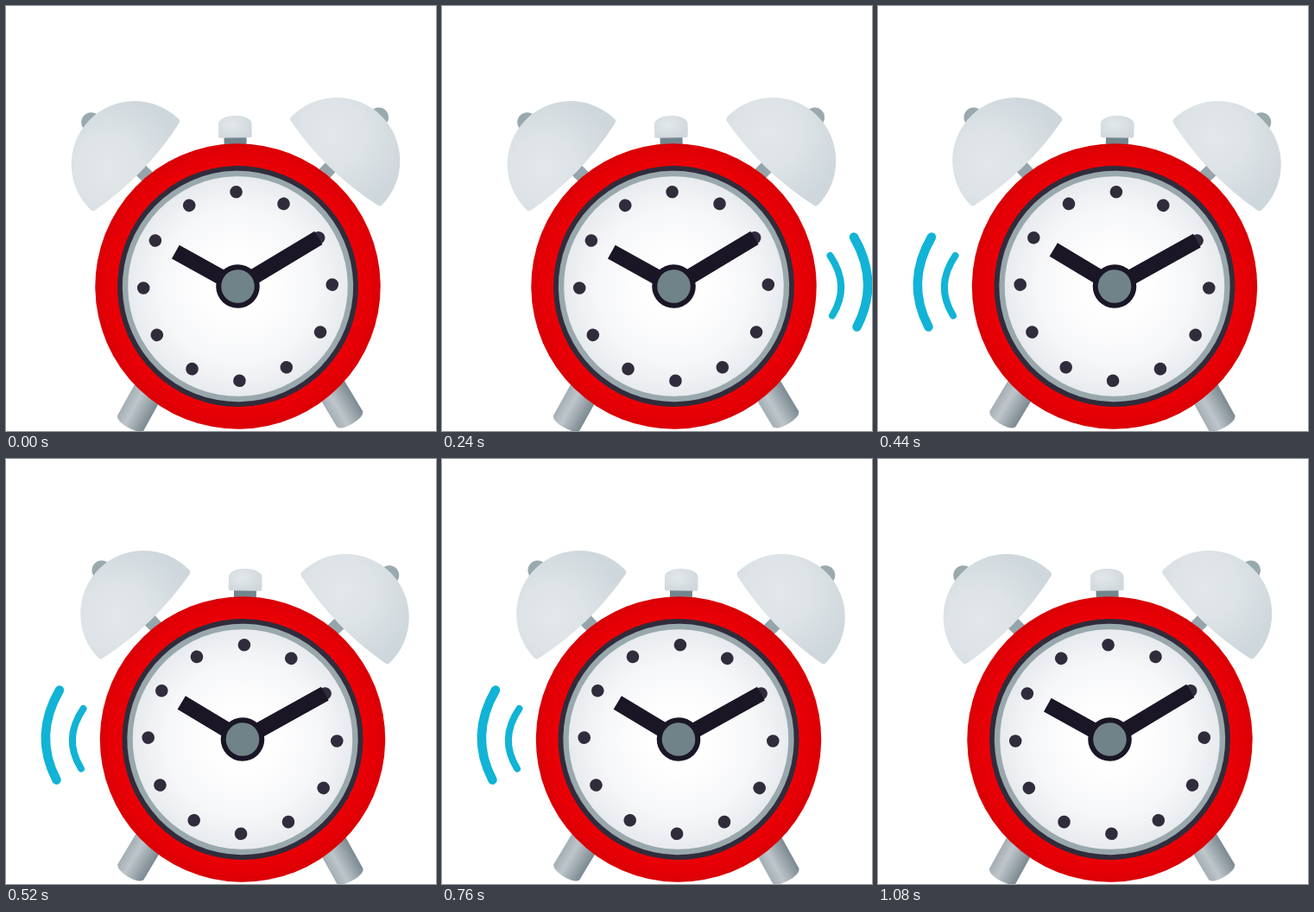
An HTML page for the animation above (1.92 s loop, 498 px wide and 492 px high).

```html
<!DOCTYPE html>
<html lang="en">
<head>
<meta charset="utf-8">
<title>Ringing alarm clock</title>
<style>
  html, body { margin: 0; width: 100%; height: 100%; overflow: hidden; background: #fff; }
  svg { display: block; width: 498px; height: 492px; }
</style>
</head>
<body>
<svg viewBox="0 0 498 492">
  <defs>
    <radialGradient id="red" gradientUnits="userSpaceOnUse" cx="0" cy="0" r="165.2">
      <stop offset=".84" stop-color="#ea0006"/>
      <stop offset=".93" stop-color="#e40006"/>
      <stop offset="1" stop-color="#d90005"/>
    </radialGradient>
    <radialGradient id="dial">
      <stop offset=".25" stop-color="#fff"/>
      <stop offset=".7" stop-color="#f6f7f9"/>
      <stop offset="1" stop-color="#e8ebee"/>
    </radialGradient>
    <radialGradient id="silver" gradientUnits="userSpaceOnUse" cx="-25" cy="-22" r="88">
      <stop offset="0" stop-color="#e3e8ea"/>
      <stop offset=".45" stop-color="#dde3e6"/>
      <stop offset="1" stop-color="#ced7dc"/>
    </radialGradient>
    <radialGradient id="cap" cx=".4" cy=".4" r=".65">
      <stop offset="0" stop-color="#e3e8ea"/>
      <stop offset="1" stop-color="#d0d8dd"/>
    </radialGradient>
    <linearGradient id="steel">
      <stop offset="0" stop-color="#a3aeb4"/>
      <stop offset=".35" stop-color="#bec6cb"/>
      <stop offset="1" stop-color="#7b8990"/>
    </linearGradient>
    <g id="bell">
      <circle cy="-73" r="11.3" fill="#99a9ae"/>
      <path d="M-8 0H8V45H-8Z" fill="#95a5ab"/>
      <path d="M-73.2-3A73.2 73.2 0 0 1 73.2-3Q73.5 0 70 1Q0 15-70 1Q-73.5 0-73.2-3Z" fill="url(#silver)"/>
    </g>
    <path id="leg" d="M-17.5-65H17.5V0Q15 6 0 6T-17.5 0Z" fill="url(#steel)"/>
    <g id="waves" fill="none" stroke="#11b3d6" stroke-linecap="round">
      <path d="M477 267.5Q507.500 320 480.500 371.500" stroke-width="10.500"/>
      <path d="M449.500 289Q473.500 324 452 358.500" stroke-width="8"/>
    </g>
  </defs>

  <g id="clock">
    <use href="#leg" transform="translate(-127 156) rotate(30)"/>
    <use href="#leg" transform="translate(127 156) rotate(-30)"/>
    <use href="#bell" transform="translate(-115 -141.2) rotate(-45)"/>
    <use href="#bell" transform="translate(115 -141.2) rotate(45)"/>
    <path d="M-13-175H13V-160H-13Z" fill="#74868d"/>
    <path d="M-19.300-174V-188C-19.300-194-10-197.500 0-197.500S19.300-194 19.300-188V-174Q19.300-172 17-172H-17Q-19.300-172-19.300-174Z" fill="url(#cap)"/>
    <circle r="165.200" fill="url(#red)"/>
    <circle r="139.500" fill="#302c3b"/>
    <circle r="133.700" fill="#99a8ad"/>
    <circle r="127.300" fill="url(#dial)"/>
    <g id="dots" fill="#302c3b"></g>
    <g fill="#1a1626">
      <path d="M-9 0V-82.500H9V0Z" transform="rotate(-60)"/>
      <path d="M-9 0V-109H9V0Z" transform="rotate(60)"/>
      <circle r="25.300"/>
    </g>
    <circle r="19.300" fill="#6f8389"/>
  </g>
  <use id="rightWaves" href="#waves"/>
  <use id="leftWaves" href="#waves" transform="translate(539 0) scale(-1 1)"/>
</svg>
<script>
  const LOOP = 1920, STEP = 40, LAST_STEP = 27;
  const byId = id => document.getElementById(id);
  const clock = byId('clock'), leftWaves = byId('leftWaves'), rightWaves = byId('rightWaves');

  byId('dots').innerHTML = Array.from({ length: 12 }, (_, hour) =>
    `<circle cy="-109.300" r="7.300" transform="rotate(${hour * 30})"/>`).join('');

  const show = (element, visible) => element.setAttribute('visibility', visible ? 'visible' : 'hidden');

  function draw(time) {
    const step = Math.floor(time % LOOP / STEP);
    const ringing = step > 0 && step < LAST_STEP;
    const leansRight = ringing && step % 2 === 1;
    clock.setAttribute('transform', `rotate(${leansRight ? 1 : -1} 271.25 482) translate(271.25 324.5)`);
    show(leftWaves, leansRight);
    show(rightWaves, ringing && !leansRight);
  }

  let start;
  function tick(now) {
    start ??= now;
    draw(now - start);
    requestAnimationFrame(tick);
  }
  draw(0);
  requestAnimationFrame(tick);
</script>
</body>
</html>
```
